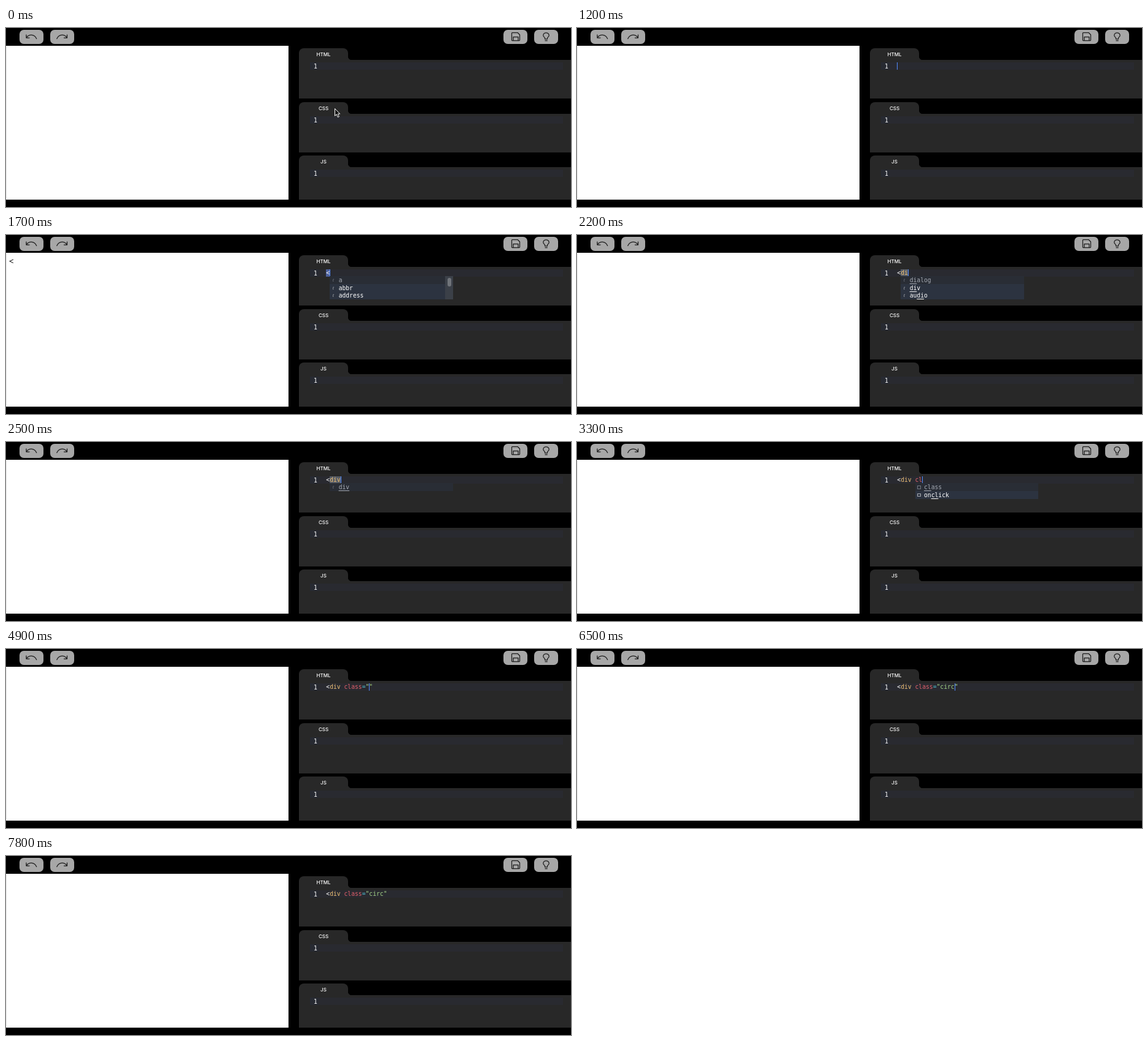
Write an HTML page that moves like this. It is 920 by 292 pixels and loops after 8 s.

```html
<!DOCTYPE html>
<html lang="en">
<head>
<meta charset="utf-8">
<title>Code editor</title>
<style>
html, body { margin: 0; width: 100%; height: 100%; overflow: hidden; background: #000; }
#stage { position: relative; width: 920px; height: 292px; overflow: hidden; }
#stage div, #stage svg { position: absolute; }
.preview { left: 0; top: 29px; width: 459px; height: 251px; background: #fff; border-left: 1px solid #e4e4e4; }
#out { left: 4px; top: 6px; font: 13px/16px "Liberation Serif", "Noto Serif", serif; -webkit-text-stroke: .3px #000; }
.btn { top: 2.5px; width: 39px; height: 23px; border-radius: 7px; background: #a7a7a7; }
.icons { left: 0; top: 0; fill: none; stroke: #1c1c1c; stroke-width: 1.25; stroke-linecap: round; stroke-linejoin: round; }
.pane { left: 477px; width: 443px; }
.tab { width: 80px; height: 20px; border-radius: 8px 8px 0 0; background: #282828;
  color: #fff; font: 500 8px/20px Inter, Roboto, sans-serif; text-align: center; }
.flare { left: 80px; top: 14px; width: 5px; height: 5px; background: radial-gradient(circle at 100% 0, transparent 4.6px, #282828 5.2px); }
.body { top: 19px; width: 443px; bottom: 0; background: #282828; }
.line { left: 18px; top: 23px; width: 412px; height: 12px; background: #292a30; }
.gutter { left: 18px; top: 23px; width: 14px; height: 12px; background: #272a32; }
.code { font: 9.7px/12px "DejaVu Sans Mono", "Liberation Mono", monospace; white-space: pre; color: #fff; }
.num { left: 24px; top: 23.5px; }
#text { left: 521.3px; top: 56px; }
#mark { top: 56px; height: 12px; }
#caret { top: 56px; width: 1px; height: 12px; background: #528bff; }
#popup { top: 67px; width: 200.5px; background: #2c3340; }
.row { left: 0; width: 100%; height: 13px; line-height: 13px; }
.row.on { background: #292d35; color: #a4a9b3; }
.row span { position: absolute; left: 14.5px; }
.row u { text-underline-offset: 1.5px; text-decoration-thickness: 1px; }
.row i { position: absolute; left: 4.5px; opacity: .6; font: italic 8.5px/13px "Liberation Serif", serif; }
.row i.prop { left: 3.5px; top: 4px; width: 3.5px; height: 3.5px; border: 1px solid; }
.bar { right: 0; top: 0; width: 13px; height: 100%; background: #3b4048; }
.bar div { left: 4px; top: 3px; width: 6px; height: 14px; border-radius: 3px; background: #70747a; }
</style>
</head>
<body>
<div id="stage">
  <div class="preview"><div id="out"></div></div>
  <div class="btn" style="left:22px"></div>
  <div class="btn" style="left:71.5px"></div>
  <div class="btn" style="left:810px"></div>
  <div class="btn" style="left:860px"></div>
  <svg class="icons" width="920" height="292">
    <g id="undo"><path d="M33 11v5h5M33.3 15.8C37 10 46 9.500 49.700 17.500"/></g>
    <use href="#undo" transform="translate(132.500) scale(-1 1)"/>
    <path d="M824.500 7.500h8.500l3.500 3.500v8.500q0 1-1 1h-11q-1 0-1-1v-11q0-1 1-1zM826 20v-5.500h8v5.500"/>
    <path d="M877.500 18v-1.500c0-1.500-2.700-2-2.700-4.500a4.700 4.200 0 0 1 9.400 0c0 2.500-2.700 3-2.700 4.500v1.500zM878 20.700h3.200"/>
  </svg>
  <div id="panes"></div>
  <div id="mark"></div>
  <div id="text" class="code"></div>
  <div id="caret"></div>
  <div id="popup" class="code"></div>
  <svg width="920" height="292" style="left:0;top:0">
    <path id="arrow" d="M535.500 131.500v11.800l2.700-2.500 2.100 4.700 2-.9-2-4.500h3.500z" fill="#111" stroke="#fff"/>
    <path id="beam" d="M532.500 91.500q2.500 0 3 1.500q.5-1.500 3-1.500M535.500 93v11M532.500 105.500q2.500 0 3-1.500q.5 1.500 3 1.500" fill="none" stroke="#ddd"/>
  </svg>
</div>
<script>
const LOOP = 8000, CHAR = 5.84, LEFT = 521.3;
const $ = id => document.getElementById(id);

const panes = [["HTML", 33, 82], ["CSS", 121, 81.5], ["JS", 208, 72]];
$("panes").innerHTML = panes.map(([name, y, h]) =>
  `<div class="pane" style="top:${y}px;height:${h}px"><div class="body"></div>
   <div class="tab">${name}</div><div class="flare"></div><div class="line"></div>
   <div class="gutter"></div><div class="code num">1</div></div>`).join("");

// Popups: anchor column, matched text, options, scrollbar
const lists = {
  all: [1, "", ["a", "abbr", "address"], true],
  d: [1, "d", ["data", "datalist", "dd"], true],
  di: [1, "di", ["dialog", "div", "audio"]],
  div: [1, "div", ["div"]],
  attrs: [5, "", ["accesskey", "class", "contenteditable"], true],
  c: [5, "c", ["class", "contenteditable", "contextmenu"], true],
  cl: [5, "cl", ["class", "onclick"]]
};

// Time, text, caret column (-1 hides it), popup
const steps = [
  [0, "", -1],
  [1200, "", 0],
  [1600, "<", 1],
  [1700, "<", 1, "all"],
  [2000, "<d", 2, "d"],
  [2200, "<di", 3, "di"],
  [2500, "<div", 4, "div"],
  [2900, "<div ", 5],
  [3000, "<div ", 5, "attrs"],
  [3100, "<div c", 6, "c"],
  [3300, "<div cl", 7, "cl"],
  [3900, "<div class", 10],
  [4500, "<div class=", 11],
  [4900, '<div class=""', 12],
  [5500, '<div class=""', -1],
  [5800, '<div class="c"', 13],
  [6000, '<div class="ci"', 14],
  [6200, '<div class="cir"', 15],
  [6500, '<div class="circ"', 16],
  [7100, '<div class="circ"', -1],
  [7200, '<div class="circ"', 17],
  [7800, '<div class="circ"', -1]
];

const colors = ["#fff", "#efc176", "#fff", "#e2606c", "#4fb8cc", "#a3d487"];
const escape = s => s.replace(/</g, "&lt;");
const column = n => LEFT + n * CHAR + "px";

function highlight(text) {
  const parts = text.match(/^(<?)(\w*)(\s*)(\w*)(=?)(.*)$/).slice(1);
  return parts.map((p, i) => `<span style="color:${colors[i]}">${escape(p)}</span>`).join("");
}

function showPopup(name) {
  const popup = $("popup");
  popup.hidden = !name;
  popup.style.display = name ? "" : "none";
  if (!name) return;
  const [col, query, options, bar] = lists[name];
  const icon = col === 1 ? "<i>t</i>" : '<i class="prop"></i>';
  popup.style.left = column(col);
  popup.style.height = options.length * 12.8 + "px";
  popup.innerHTML = options.map((o, i) =>
    `<div class="row${i ? "" : " on"}" style="top:${i * 12.7}px">${icon}<span>${
      query ? o.replace(query, "<u>$&</u>") : o}</span></div>`).join("") +
    (bar ? '<div class="bar"><div></div></div>' : "");
}

function show([time, text, caret, popup]) {
  $("out").textContent = text === "<" ? "<" : "";
  $("text").innerHTML = highlight(text);
  $("caret").style.display = caret < 0 ? "none" : "";
  $("caret").style.left = column(caret);
  const mark = $("mark").style, word = text.length - 1;
  mark.display = text && !text.includes(" ") ? "" : "none";
  mark.left = column(word ? 1 : 0);
  mark.width = (word || 1) * CHAR + "px";
  mark.background = word ? "#565c66" : "#4d609b";
  showPopup(popup);
}

let last;
function frame(now) {
  const t = now % LOOP;
  const step = steps.filter(s => s[0] <= t).pop();
  if (step !== last) show(last = step);
  $("arrow").style.display = t < 100 ? "" : "none";
  $("beam").style.display = t >= 100 && t < 900 ? "" : "none";
  requestAnimationFrame(frame);
}
frame(0);
</script>
</body>
</html>
```
